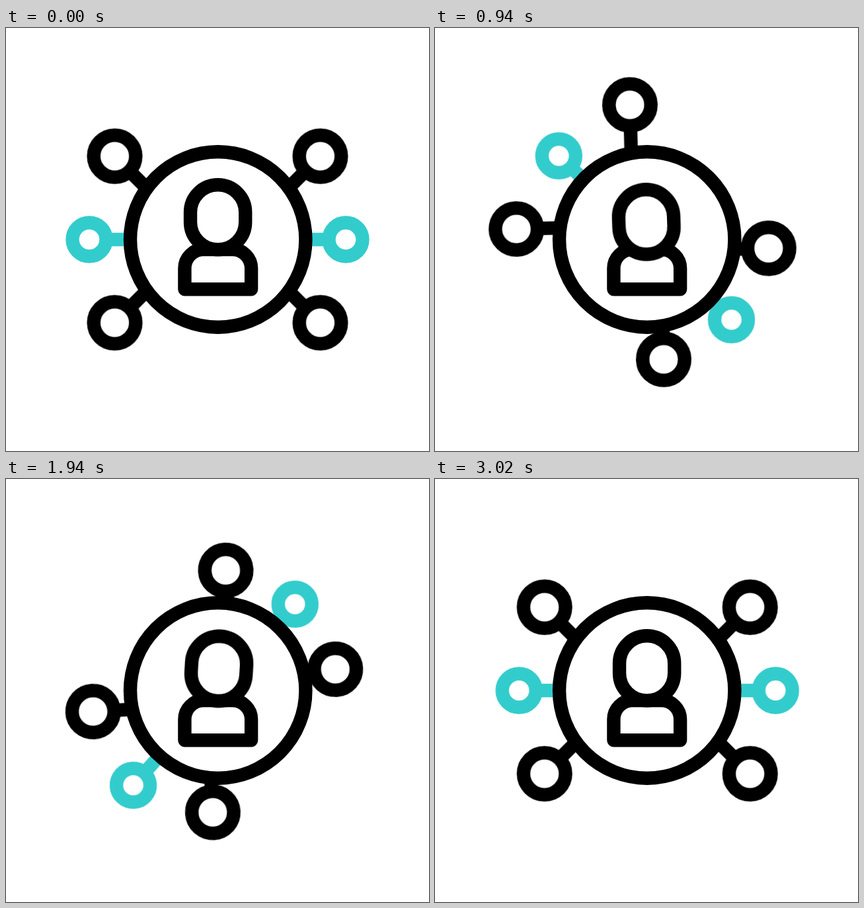
An HTML page for the animation above (3600 ms loop, 640 px wide and 640 px high).

```html
<!DOCTYPE html>
<html lang="en">
<head>
<meta charset="utf-8">
<title>Network</title>
<style>
  html, body { margin: 0; width: 100%; height: 100%; overflow: hidden; background: #fff; }
  svg { display: block; width: 100vw; height: 100vh; }

  /* With these handles every segment eases as 3s² - 2s³ */
  .orbit, .node, .nod, .tilt {
    animation: 3600ms cubic-bezier(.3333, 0, .6667, 1) infinite;
  }
  .orbit { animation-name: orbit; transform-origin: 320.6px 320px; }
  .node  { animation-name: pulse; animation-delay: calc(var(--i) * 80ms); }
  .nod   { animation-name: nod; }
  .tilt  { animation-name: tilt; transform-origin: 320.5px 311px; }

  .node, .hub { stroke: #000; stroke-width: 20.4; fill: #fff; }
  .teal { stroke: #33cccc; }
  .hub { stroke-linejoin: round; }

  @keyframes orbit {
    0% { transform: rotate(0deg); }
    81.667%, 100% { transform: rotate(180deg); }
  }
  /* Each node swings between its own inner and outer offsets */
  @keyframes pulse {
    0% { transform: translate(0, 0); }
    16.667% { transform: translate(var(--in)); }
    33.333% { transform: translate(var(--out)); }
    50% { transform: translate(var(--in)); }
    66.667%, 100% { transform: translate(0, 0); }
  }
  @keyframes nod {
    0%, 15.556% { transform: translateY(0); }
    22.222% { transform: translateY(10px); }
    33.333% { transform: translateY(0); }
    44.444% { transform: translateY(10px); }
    55.556% { transform: translateY(0); }
    66.667% { transform: translateY(8px); }
    82.5%, 100% { transform: translateY(0); }
  }
  @keyframes tilt {
    0% { transform: rotate(0deg); }
    11.111% { transform: rotate(8deg); }
    22.222% { transform: rotate(-6deg); }
    33.333% { transform: rotate(8deg); }
    44.444% { transform: rotate(-6deg); }
    55.556% { transform: rotate(4deg); }
    68.889% { transform: rotate(-6deg); }
    83.889%, 100% { transform: rotate(0deg); }
  }
</style>
</head>
<body>
<svg viewBox="0 0 640 640">
  <defs>
    <g id="big"><path d="M-110 0H-30"/><circle r="31.8"/></g>
    <g id="small"><path d="M-110 0H-24"/><circle r="25.5"/></g>
  </defs>

  <g class="orbit">
    <g class="node teal" style="--i:2; --in:19.6px,0px; --out:-20.8px,0px">
      <use href="#small" transform="translate(126 320) rotate(180)"/>
    </g>
    <g class="node teal" style="--i:5; --in:-17.5px,0px; --out:23.6px,0px">
      <use href="#small" transform="translate(514 320)"/>
    </g>
    <g class="node" style="--i:0; --in:16px,17.3px; --out:-15.2px,-18.2px">
      <use href="#big" transform="translate(164.5 194) rotate(225)"/>
    </g>
    <g class="node" style="--i:1; --in:13px,-14.2px; --out:-14.3px,17.2px">
      <use href="#big" transform="translate(164.5 446) rotate(135)"/>
    </g>
    <g class="node" style="--i:3; --in:-14.5px,11.3px; --out:16.6px,-21.1px">
      <use href="#big" transform="translate(475.5 194) rotate(-45)"/>
    </g>
    <g class="node" style="--i:4; --in:-11.7px,-12px; --out:18px,14.3px">
      <use href="#big" transform="translate(475.5 446) rotate(45)"/>
    </g>
  </g>

  <g class="hub">
    <circle cx="320.7" cy="320" r="132.7"/>
    <path d="M270.4 395.3V363.5a28.5 28.5 0 0 1 28.5-28.5H342.6a28.5 28.5 0 0 1 28.5 28.5V395.3Z"/>
    <g class="nod"><g class="tilt">
      <rect x="279" y="237.3" width="83.2" height="98" rx="41.6"/>
    </g></g>
  </g>
</svg>
</body>
</html>
```
